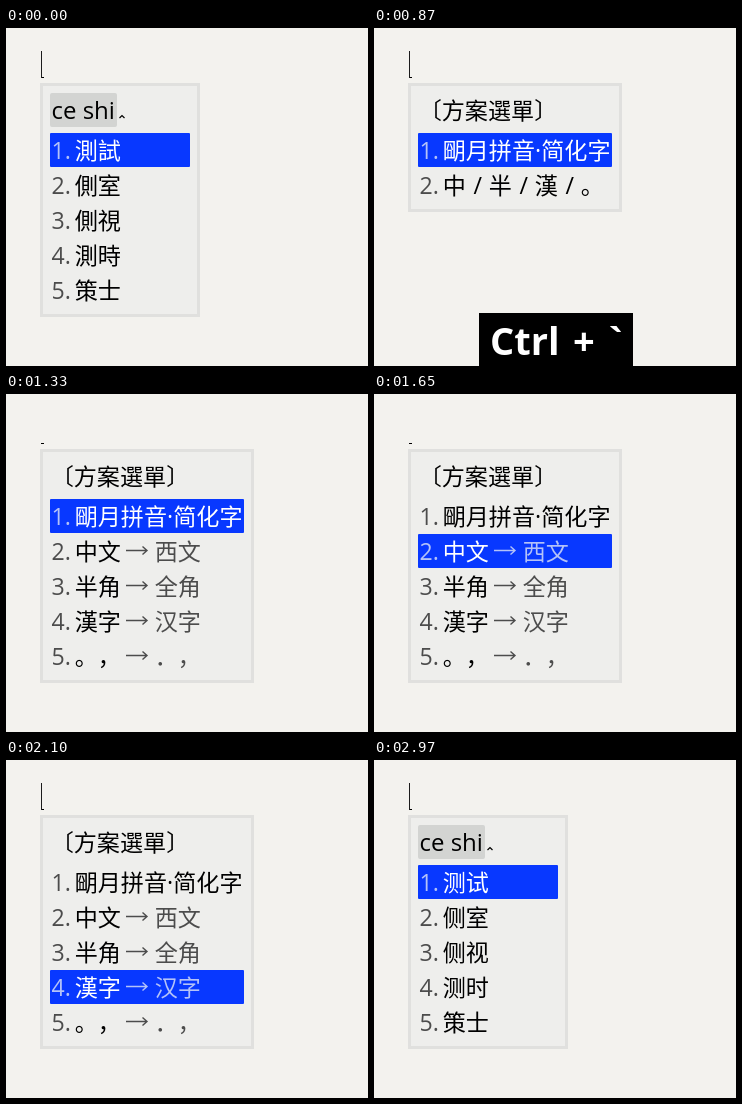
An HTML page for the animation above (3280 ms loop, 362 px wide and 338 px high).

```html
<!DOCTYPE html>
<html lang="zh-CN">
<head>
<meta charset="utf-8">
<title>Input method menu</title>
<style>
html, body { margin: 0; width: 100%; height: 100%; overflow: hidden; background: #f3f2ee; }
svg { display: block; }
text {
  font: 23.1px "Open Sans", "Noto Sans CJK SC", "Noto Sans CJK", sans-serif;
  font-kerning: none;
  font-feature-settings: "chws" 0, "halt" 0;
  text-spacing-trim: space-all;
  white-space: pre;
}
.code { font-size: 24px; }
.key { font-size: 38px; font-weight: 700; }
</style>
</head>
<body>
<svg id="stage" width="362" height="338" viewBox="0 0 362 338"></svg>
<script>
const LOOP = 3280, ROW = 35;
const BLUE = '#0838ff', INK = '#000', DIM = '#4c4c4c', PALE = '#b4c2f8';
const stage = document.getElementById('stage');

const rect = (x, y, w, h, fill, extra = '') =>
  `<rect x="${x}" y="${y}" width="${w}" height="${h}" fill="${fill}" ${extra}/>`;
const text = (x, y, str, fill = INK, cls = '') =>
  `<text x="${x}" y="${y}" fill="${fill}" class="${cls}">${str}</text>`;
const line = (d, color, width) =>
  `<path d="${d}" fill="none" stroke="${color}" stroke-width="${width}"/>`;

const candidates = words => ({ width: 160, rows: words.map(w => [w]) });
const screens = {
  trad: candidates(['測試', '側室', '側視', '測時', '策士']),
  simp: candidates(['测试', '侧室', '侧视', '测时', '策士']),
  folded: { width: 214, menu: true, rows: [['朙月拼音·简化字'], ['中半漢。', null]] },
  open: {
    width: 214, menu: true,
    rows: [['朙月拼音·简化字'], ['中文', '西文'], ['半角', '全角'], ['漢字', '汉字'], ['。，', '．，']]
  }
};

// start time, screen, selected row, cursor shown, key label shown
const steps = [
  [0, 'trad', 0, 1, 0],
  [320, 'trad', 0, 1, 1],
  [390, 'folded', 0, 0, 1],
  [870, 'folded', 0, 1, 1],
  [1250, 'folded', 0, 1, 0],
  [1330, 'open', 0, 0, 0],
  [1650, 'open', 1, 0, 0],
  [1800, 'open', 1, 1, 0],
  [1880, 'open', 2, 1, 0],
  [2100, 'open', 3, 1, 0],
  [2420, 'simp', 0, 0, 0],
  [2970, 'simp', 0, 1, 0]
];

function drawRow([label, target], i, selected, width) {
  const y = 131 + i * ROW;
  const ink = selected ? '#fff' : INK, dim = selected ? PALE : DIM;
  let out = selected ? rect(44, 105 + i * ROW, width - 20, 34, BLUE, 'rx="1"') : '';
  out += text(45.5, y, `${i + 1}.`, dim);
  if (target === null) {
    [...label].forEach((ch, k) => {
      out += text(68.7 + k * 46, y, ch, ink);
      if (k < 3) out += text(99.5 + k * 46, y, '/', ink);
    });
    return out;
  }
  out += text(68.7, y, label, ink);
  if (target) {
    const mid = y - 9.5;
    out += line(`M120 ${mid}H141M136.5 ${mid - 4}L141 ${mid}L136.5 ${mid + 4}`, dim, 1.4);
    out += text(148.7, y, target, dim);
  }
  return out;
}

function drawWindow({ width, menu, rows }, selected) {
  const height = 59 + rows.length * ROW;
  let out = rect(35.5, 56.5, width - 3, height - 3, '#eeeeec', 'stroke="#e0e0de" stroke-width="3"');
  if (menu) {
    out += text(44.7, 91, '〔方案選單〕');
  } else {
    out += rect(44, 65, 67, 34, '#d3d4d2', 'rx="2"');
    out += text(45.5, 91, 'ce shi', INK, 'code');
    out += line('M113.5 90L116 87.5L118.5 90', INK, 1.2);
  }
  return out + rows.map((row, i) => drawRow(row, i, i === selected, width)).join('');
}

function drawKeys() {
  return rect(105, 285, 154, 53, '#000') +
    text(116, 327, 'Ctrl', '#fff', 'key') +
    text(199, 327, '+', '#fff', 'key') +
    text(230, 327, '`', '#fff', 'key');
}

let shown;
function update(now) {
  const t = now % LOOP;
  const step = steps.findLast(s => s[0] <= t);
  if (step !== shown) {
    shown = step;
    const [, screen, selected, cursor, keys] = step;
    stage.innerHTML = rect(0, 0, 362, 338, '#f3f2ee') +
      rect(35, 49, 3, 1, INK) +
      (cursor ? rect(35, 23, 1, 27, '#1c1c1c') : '') +
      drawWindow(screens[screen], selected) +
      (keys ? drawKeys() : '');
  }
}

const start = performance.now();
function tick() {
  update(performance.now() - start);
  requestAnimationFrame(tick);
}
tick();
</script>
</body>
</html>
```
